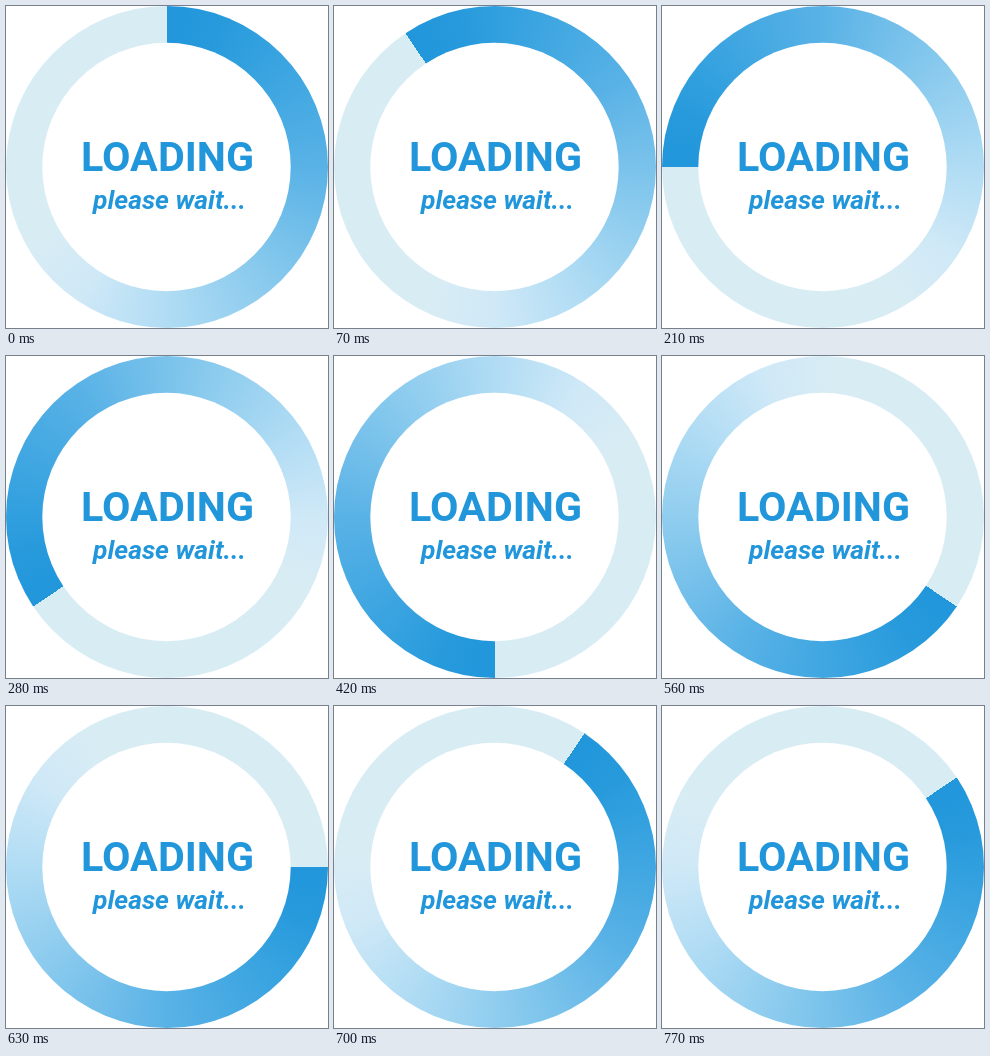
An HTML page with a canvas for the animation above (840 ms loop, 322 by 322 pixels).

```html
<!DOCTYPE html>
<html lang="en">
<head>
<meta charset="utf-8">
<title>Loading</title>
<style>
  html, body { margin: 0; width: 100%; height: 100%; overflow: hidden; background: #fff; }
  canvas { display: block; }
</style>
</head>
<body>
<canvas id="stage" width="322" height="322"></canvas>
<script>
const ctx = document.getElementById("stage").getContext("2d");
const CENTER = 161, OUTER = 161, HOLE_X = 160.5, HOLE_RADIUS = 124.2;
const STEP_MS = 70, SEGMENTS = 32;
const BLUE = "#2196db", PALE = "#d8ecf4";

// Position of the dark end at each step, in twelfths of a turn counter-clockwise.
const ORDER = [0, 1, 2, 3, 4, 5, 6, 7, 8, 9, 11, 10];

// Colours behind the dark end, by clockwise angle.
const FADE = [[0, BLUE], [20, "#279adc"], [45, "#38a3e0"], [90, "#59b2e6"],
  [135, "#85c8ed"], [180, "#b0dcf4"], [215, "#d0e9f7"], [240, PALE], [360, PALE]];

const radians = degrees => degrees * Math.PI / 180;

function fillCircle(style, x, radius) {
  ctx.beginPath();
  ctx.arc(x, CENTER, radius, 0, 2 * Math.PI);
  ctx.fillStyle = style;
  ctx.fill();
}

function drawRing(twelfth) {
  // The dark edge snaps to the nearest of 32 segments.
  const head = -Math.round(twelfth * SEGMENTS / 12) * 360 / SEGMENTS;
  const gradient = ctx.createConicGradient(radians(head - 90), CENTER, CENTER);
  FADE.forEach(([angle, color]) => gradient.addColorStop(angle / 360, color));
  fillCircle(gradient, CENTER, OUTER);
  fillCircle("#fff", HOLE_X, HOLE_RADIUS);
}

function drawLabel(text, style, left, right, baseline) {
  const width = right - left;
  const setSize = size => { ctx.font = `${style} ${size}px Roboto, "Open Sans", sans-serif`; };
  setSize(100);
  setSize(100 * width / ctx.measureText(text).width);
  ctx.fillStyle = BLUE;
  ctx.textAlign = "center";
  ctx.fillText(text, left + width / 2, baseline);
}

function draw(now) {
  const step = Math.floor(now / STEP_MS) % ORDER.length;
  ctx.fillStyle = "#fff";
  ctx.fillRect(0, 0, 322, 322);
  drawRing(ORDER[step]);
  drawLabel("LOADING", "bold semi-condensed", 75, 248, 164.5);
  drawLabel("please wait...", "italic bold", 87, 240, 203);
}

const start = performance.now();
function tick() {
  draw(performance.now() - start);
  requestAnimationFrame(tick);
}
tick();
</script>
</body>
</html>
```
